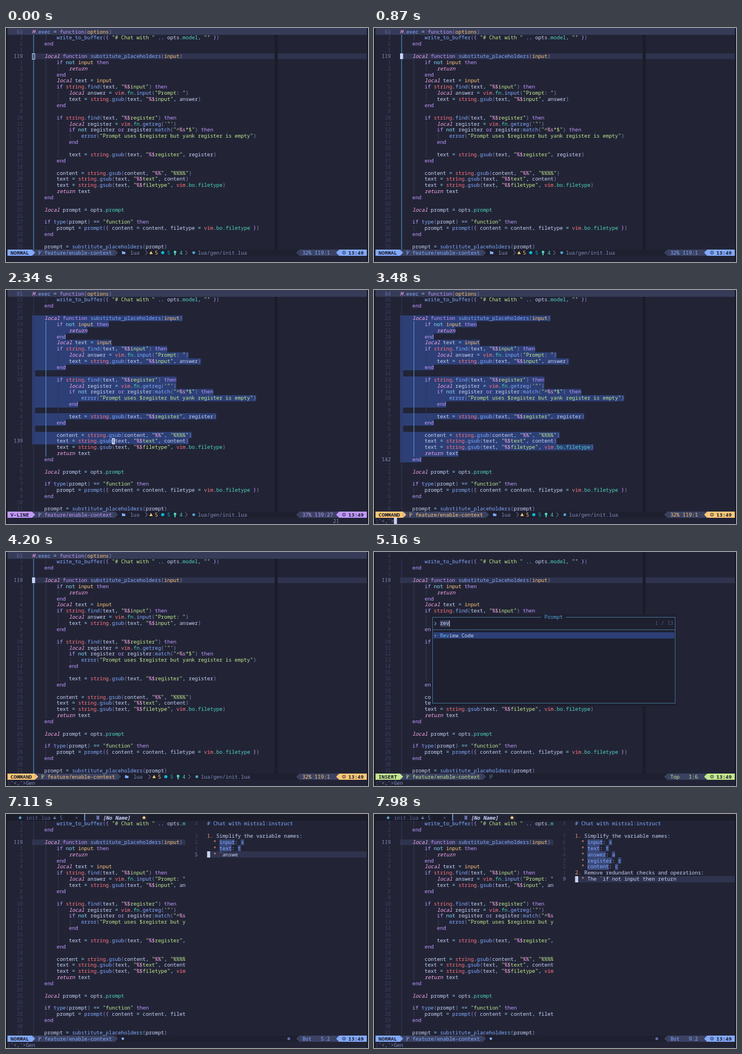
An HTML page with a canvas that plays this animation: 640x414 px, repeating every 8 s.

```html
<!DOCTYPE html>
<html lang="en">
<head>
<meta charset="utf-8">
<title>Editor session</title>
<style>
html, body { margin: 0; width: 100%; height: 100%; overflow: hidden; background: #222436; }
canvas { display: block; }
</style>
</head>
<body>
<canvas id="stage" width="640" height="414"></canvas>
<script>
const ctx = document.getElementById('stage').getContext('2d');
const LOOP = 8000;
const CELL = 5.43, PITCH = 10.87, LEFT = 2.6, TOP = 1.1;
const TEXT = 8, SPLIT = 58, CHAT = 65;      // first columns of code, separator and chat text
const DEF_ROW = 4, END_ROW = 27, DEF_LINE = 119, CONTEXT_LINE = 58;
const C = {
  bg: '#222436', dark: '#1e2030', black: '#1b1d2b', edge: '#161722', line: '#2f334d', gutter: '#3b4261',
  fg: '#c8d3f5', dim: '#828bb8', comment: '#636da6', select: '#2d3f76', context: '#363c58',
  blue: '#82aaff', sky: '#65bcff', op: '#89ddff', purple: '#c099ff', pink: '#fca7ea',
  green: '#c3e88d', yellow: '#ffc777', orange: '#ff966c', red: '#ff757f', teal: '#4fd6be',
  border: '#41728f', title: '#589ed7'
};
const MODE_COLOR = { NORMAL: C.blue, 'V-LINE': C.purple, COMMAND: C.yellow, INSERT: C.green };

const code = `M.exec = function(options)
        write_to_buffer({ "# Chat with " .. opts.model, "" })
    end

    local function substitute_placeholders(input)
        if not input then
            return
        end
        local text = input
        if string.find(text, "%$input") then
            local answer = vim.fn.input("Prompt: ")
            text = string.gsub(text, "%$input", answer)
        end

        if string.find(text, "%$register") then
            local register = vim.fn.getreg('"')
            if not register or register:match("^%s*$") then
                error("Prompt uses $register but yank register is empty")
            end

            text = string.gsub(text, "%$register", register)
        end

        content = string.gsub(content, "%%", "%%%%")
        text = string.gsub(text, "%$text", content)
        text = string.gsub(text, "%$filetype", vim.bo.filetype)
        return text
    end

    local prompt = opts.prompt

    if type(prompt) == "function" then
        prompt = prompt({ content = content, filetype = vim.bo.filetype })
    end

    prompt = substitute_placeholders(prompt)`.split('\n');

const prompts = ['Ask', 'Change', 'Change Code', 'Chat', 'Enhance Code', 'Enhance Grammar Spelling',
  'Enhance Wording', 'Generate', 'Make Concise', 'Make List', 'Make Table', 'Review Code', 'Summarize'];

const reply = `1. Simplify the variable names:
  * \`input\`: \`s\`
  * \`text\`: \`t\`
  * \`answer\`: \`a\`
  * \`register\`: \`r\`
  * \`content\`: \`c\`
2. Remove redundant checks and operations:
  * The \`if not input then return`;

const rules = [
  [/^("[^"]*"|'[^']*')/, C.green],
  [/^(local|return)\b/, C.pink, 'italic'],
  [/^(function|if|then|end|or)\b/, C.purple],
  [/^not\b/, C.op],
  [/^M\b/, C.pink, 'italic'],
  [/^(string|vim)\b/, C.red],
  [/^(exec|\w+(?=\())/, C.blue],
  [/^(input|options)\b/, C.yellow],
  [/^(model|fn|bo)\b|^filetype(?! =)|^prompt$/, C.teal],
  [/^\w+/, C.fg],
  [/^[=.,:]+/, C.op],
  [/^[{}]/, C.purple],
  [/^\s+/, C.fg],
  [/^./, C.dim]
];

// Splits a code line into coloured pieces: [column, text, colour, style].
function tokenize(line) {
  const out = [];
  let col = 0;
  while (col < line.length) {
    const rest = line.slice(col);
    const [rule, color, style] = rules.find(r => r[0].test(rest));
    const word = rest.match(rule)[0];
    const parts = color === C.green && !word.includes('%%%%') ? word.split(/(%[%$s])/) : [word];
    for (const part of parts) {
      out.push([col, part, /^%/.test(part) ? C.pink : color, style]);
      col += part.length;
    }
  }
  return out;
}
const tokens = code.map(tokenize);
const indentOf = line => line.search(/\S/);
const indents = code.map((line, i) => line ? indentOf(line) : Math.max(indentOf(code[i - 1]), indentOf(code[i + 1])));

const X = col => LEFT + col * CELL;
const Y = row => TOP + row * PITCH;
const clamp = (v, lo, hi) => Math.min(hi, Math.max(lo, v));

// Fills snap to whole pixels vertically so that stacked rows meet without seams.
function rect(x, y, w, h, color) {
  const top = Math.round(y);
  ctx.fillStyle = color;
  ctx.fillRect(x, top, w, Math.round(y + h) - top);
}
const cells = (col, row, n, color) => rect(X(col), Y(row), n * CELL, PITCH, color);
function put(text, col, row, color, style = '') {
  ctx.font = `${style} 9.05px "Noto Sans Mono", "DejaVu Sans Mono", monospace`;
  ctx.fillStyle = color;
  ctx.fillText(text, X(col), Y(row) + 8.4);
}
function shape(color, ...points) {
  ctx.fillStyle = color;
  ctx.beginPath();
  points.forEach(([x, y]) => ctx.lineTo(x, y));
  ctx.fill();
}
function dot(x, y, r, color) {
  ctx.fillStyle = color;
  ctx.beginPath();
  ctx.arc(x, y, r, 0, 7);
  ctx.fill();
}
function stroke(color, ...points) {
  ctx.strokeStyle = color;
  ctx.lineWidth = 1;
  ctx.beginPath();
  points.forEach(([x, y]) => ctx.lineTo(x, y));
  ctx.stroke();
}
const warning = (x, y, color) => shape(color, [x, y - 3], [x + 3, y + 2.5], [x - 3, y + 2.5]);

function stateAt(t) {
  const s = { t };
  s.mode = t < 1250 ? 'NORMAL' : t < 2850 ? 'V-LINE' : t < 4500 ? 'COMMAND' : t < 5500 ? 'INSERT' : 'NORMAL';
  s.selecting = t >= 1250 && t < 4110;
  s.popup = s.mode === 'INSERT';
  s.split = t >= 5500;
  s.row = s.selecting ? DEF_ROW + clamp(Math.floor((t - 1860) / 24), 0, END_ROW - DEF_ROW) : DEF_ROW;
  s.col = t >= 950 && t < 4110 ? Math.min(26, Math.max(0, code[s.row].length - 1)) : 0;
  s.command = t < 2850 ? '' : ":'<,'>" + 'Gen'.slice(0, clamp(Math.floor((t - 3450) / 150), 0, 3));
  s.query = 'rev'.slice(0, clamp(Math.floor((t - 4920) / 70), 0, 3));
  s.streaming = t >= 6600;
  s.reply = reply.slice(0, Math.ceil(reply.length * clamp((t - 6600) / 1350, 0, 1))).split('\n');
  s.place = s.popup ? ['Top', '  1:' + (3 + s.query.length)]
    : s.streaming ? ['Bot', `  ${s.reply.length + 1}:2`]
    : s.split ? ['Bot', '  2:1']
    : s.mode === 'COMMAND' ? ['32%', '119:1']
    : [Math.floor((DEF_LINE + s.row - DEF_ROW) / 3.71) + '%', `${DEF_LINE + s.row - DEF_ROW}:${s.col + 1}`];
  return s;
}

function drawCode(s) {
  if (!s.selecting) cells(TEXT, DEF_ROW, (s.split ? SPLIT : 117) - TEXT, C.line);
  if (!s.split) rect(X(TEXT + 79), 0, CELL, Y(36), C.black);

  ctx.save();
  ctx.beginPath();
  ctx.rect(0, 0, s.split ? X(SPLIT) : 640, Y(36));
  ctx.clip();
  if (s.selecting) {
    for (let r = DEF_ROW; r <= s.row; r++) cells(TEXT, r, Math.max(1, code[r].length), C.select);
    if (s.mode === 'V-LINE' && s.row === DEF_ROW) cells(TEXT + 13, 35, 23, C.gutter);
  }
  const scoped = !s.popup && !s.split;
  const scope = s.col >= 4 ? 4 : 0;
  for (let r = 0; r < code.length; r++) {
    const hasContext = r === 0 && !s.popup;
    if (hasContext) rect(LEFT, 0, 640, Y(1), C.context);
    const line = DEF_LINE + r - DEF_ROW, current = DEF_LINE + s.row - DEF_ROW;
    const number = String(hasContext ? current - CONTEXT_LINE : line === current ? line : Math.abs(line - current));
    put(number, 5 - number.length, r, line === current ? C.dim : hasContext ? C.comment : C.gutter);
    for (let c = 0; c < indents[r]; c += 4) {
      const active = scoped && c === scope && (scope === 0 || r > DEF_ROW && r < END_ROW);
      rect(X(TEXT + c) + 2.3, Y(r), 1, PITCH, active ? '#5a9fd4' : '#343a55');
    }
    if (r > 0 || hasContext)
      for (const [c, text, color, style] of tokens[r]) put(text, TEXT + c, r, color, style);
  }
  ctx.restore();
}

function drawCursor(s) {
  if (s.popup || s.split || s.mode === 'COMMAND' && s.selecting) return;
  const col = TEXT + s.col;
  if (s.t < 400) {
    ctx.strokeStyle = C.fg;
    ctx.lineWidth = 1;
    ctx.strokeRect(X(col) + .5, Math.round(Y(s.row)) + .5, CELL - 1, PITCH - 1);
  } else {
    cells(col, s.row, 1, C.fg);
    put(code[s.row][s.col] || '', col, s.row, C.bg);
  }
}

function drawPopup(s) {
  const fuzzy = new RegExp([...s.query].join('.*?'), 'i');
  const rank = name => { const m = name.match(fuzzy); return s.query ? m.index + m[0].length : 0; };
  const found = prompts.filter(p => fuzzy.test(p)).sort((a, b) => rank(a) - rank(b));
  rect(X(18), Y(10), 80 * CELL, 15 * PITCH, C.dark);
  ctx.strokeStyle = C.border;
  ctx.lineWidth = 1;
  ctx.strokeRect(103.5, 115.5, 429, 152);
  stroke(C.border, [104, 137.5], [533, 137.5]);
  cells(54, 10, 8, C.dark);
  put('Prompt', 55, 10, C.title);
  stroke(C.fg, [107, 124], [110, 126.7], [107, 129.5]);
  cells(21, 11, s.query.length, C.gutter);
  put(s.query, 21, 11, C.fg);
  rect(X(21 + s.query.length), Y(11), 1, PITCH, C.fg);
  const count = `${found.length} / ${prompts.length}`;
  put(count, 97 - count.length, 11, '#545c7e');
  found.slice(0, 11).forEach((name, i) => {
    const row = 13 + i;
    if (i === 0) {
      rect(105, Y(row), 426, PITCH, C.select);
      dot(108.5, Y(row) + 5.6, .9, C.fg);
    }
    const hit = s.query && name.toLowerCase().startsWith(s.query) ? s.query.length : 0;
    put(name.slice(0, hit), 21, row, C.sky);
    put(name.slice(hit), 21 + hit, row, C.fg);
  });
}

function drawTabs() {
  rect(0, 0, 640, Y(1), C.black);
  rect(X(25), 0, 113, Y(1), C.bg);
  rect(X(25), 0, 1.5, Y(1), C.blue);
  dot(25, 6.7, 2.4, '#51a0cf');
  put('init.lua', 6, 0, C.comment);
  warning(86, 6.5, C.comment);
  put('5', 17, 0, C.comment);
  put('×', 22, 0, C.comment);
  rect(160, 3, 5, 7, C.comment);
  put('[No Name]', 31, 0, C.fg, 'italic bold');
  dot(244, 6.5, 2.5, C.yellow);
}

function drawReplyLine(line, row) {
  const marker = line.match(/^(\d\.|\s*\*)?/)[0];
  put(marker, CHAT, row, C.orange);
  let col = CHAT + marker.length;
  for (const part of line.slice(marker.length).split(/(`[^`]+`)/)) {
    const inline = /^`.+`$/.test(part);
    const text = inline ? part.slice(1, -1) : part;
    if (inline) cells(col, row, text.length, '#3a4878');
    put(text, col, row, inline ? C.blue : C.fg);
    col += text.length;
  }
}

function drawChat(s) {
  rect(X(SPLIT), Y(1), 640, Y(36) - Y(1), C.bg);
  const lines = s.streaming ? s.reply : [''];
  const first = s.streaming ? 3 : 2, last = first + lines.length - 1;
  cells(CHAT, last, 117 - CHAT, C.line);
  put(s.streaming ? String(lines.length) : '1', 61, 1, C.gutter);
  put('# Chat with mistral:instruct', CHAT, 1, C.blue);
  lines.forEach((line, i) => {
    const current = first + i === last;
    put(String(current ? lines.length + 1 : last - first - i), 61, first + i, current ? C.dim : C.gutter);
    drawReplyLine(line, first + i);
  });
  cells(CHAT, last, 1, C.fg);
}

function drawStatus(s) {
  const row = 36, y = Math.round(Y(row)), bottom = Math.round(Y(row + 1)), mid = (y + bottom) / 2;
  const color = MODE_COLOR[s.mode];
  const shift = s.mode.length - 6;
  const right = (col, fill) => shape(fill, [X(col), y], [X(col + 1), mid], [X(col), bottom]);
  const left = (col, fill) => shape(fill, [X(col + 1), y], [X(col), mid], [X(col + 1), bottom]);
  rect(0, y, 640, PITCH, C.dark);

  cells(8 + shift, row, 27, C.gutter);
  right(35 + shift, C.gutter);
  cells(0, row, 8 + shift, color);
  right(8 + shift, color);
  put(s.mode, 1, row, C.black, 'bold');
  const bx = X(10 + shift) + 1.5;
  stroke(color, [bx, mid + 4], [bx, mid - 4]);
  stroke(color, [bx, mid + 1], [bx + 3, mid - 1], [bx + 3, mid - 3]);
  put('feature/enable-context', 12 + shift, row, color);

  const icon = X(37 + shift) + 2.5;
  if (s.popup) {
    for (const [dy, w] of [[-2.5, 6], [0, 6], [2.5, 4]]) stroke(C.comment, [icon - 2, mid + dy], [icon - 2 + w, mid + dy]);
  } else if (s.split) {
    dot(icon + .5, mid, 2.2, C.blue);
    if (s.streaming) dot(500, mid, 2.5, C.comment);
  } else {
    const at = col => X(col + shift);
    const chevron = x => stroke(C.dim, [x, mid - 4], [x + 3.5, mid], [x, mid + 4]);
    rect(icon - 1, mid - 2, 6, 4.5, C.blue);
    rect(icon - 1, mid - 3, 3, 1, C.blue);
    put('lua', 40 + shift, row, C.dim);
    chevron(at(45) - .5);
    warning(at(46) + 4, mid, C.yellow);
    put('5', 48 + shift, row, C.yellow);
    dot(at(50) + 3, mid, 2.8, '#0db9d7');
    put('5', 52 + shift, row, '#0db9d7');
    dot(at(54) + 3, mid - 1, 2.4, C.teal);
    rect(at(54) + 2, mid + 1, 2, 3, C.teal);
    put('4', 56 + shift, row, C.teal);
    chevron(at(58) - .5);
    dot(at(60) + 3.5, mid, 2.5, '#51a0cf');
    put('lua/gen/init.lua', 62 + shift, row, C.dim);
  }

  left(94, C.gutter);
  cells(95, row, 13, C.gutter);
  put(s.place[0], 96, row, color);
  put(s.place[1], 100, row, color);
  left(107, color);
  cells(108, row, 9, color);
  ctx.strokeStyle = C.black;
  ctx.lineWidth = 1;
  ctx.beginPath();
  ctx.arc(597.5, mid, 2.6, 0, 7);
  ctx.stroke();
  dot(597.5, mid, .7, C.black);
  put('13:49', 111, row, C.black, 'bold');
}

function drawCommand(s) {
  put(s.command, 0, 37, C.dim);
  if (s.mode === 'COMMAND' && s.selecting) cells(s.command.length, 37, 1, C.fg);
  if (s.mode === 'V-LINE') put(String(s.row - DEF_ROW + 1), 106, 37, C.dim);
}

function draw(now) {
  const s = stateAt(now % LOOP);
  rect(0, 0, 640, 414, C.bg);
  drawCode(s);
  drawCursor(s);
  if (s.popup) drawPopup(s);
  if (s.split) {
    drawTabs();
    drawChat(s);
  }
  drawStatus(s);
  drawCommand(s);
  rect(0, 0, 2, 414, C.edge);
  rect(638, 0, 2, 414, C.edge);
}

const start = performance.now();
function tick() {
  draw(performance.now() - start);
  requestAnimationFrame(tick);
}
tick();
</script>
</body>
</html>
```
